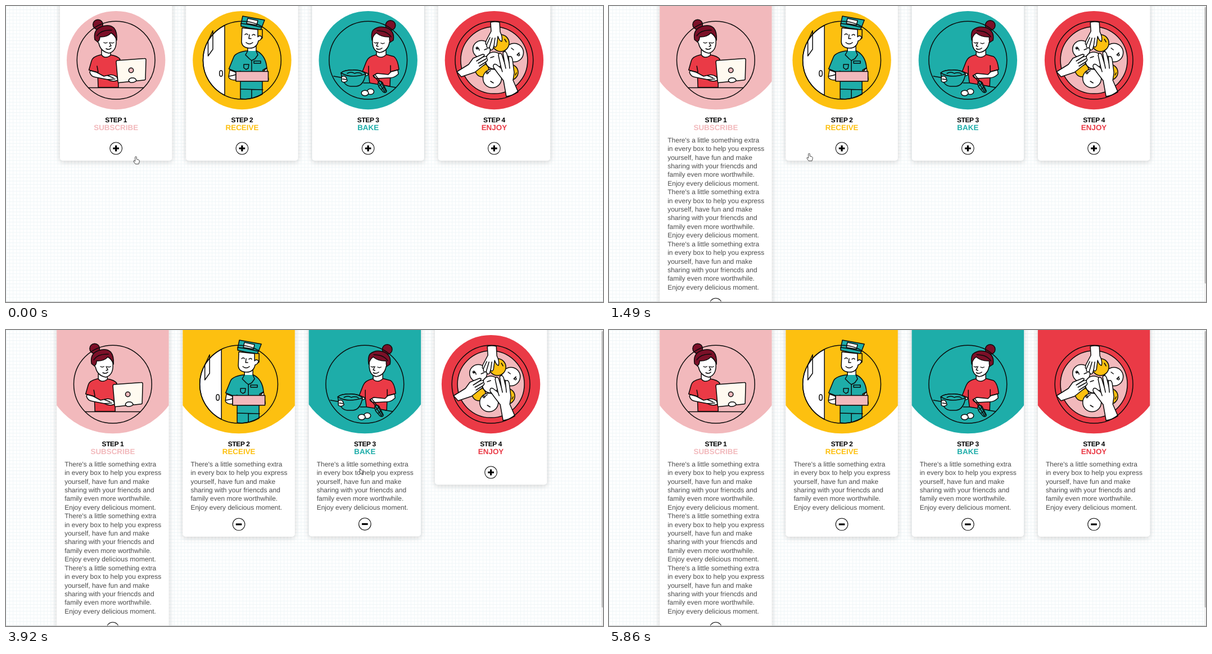
Animation of 1062 by 527 pixels, one loop 6360 ms. Source, as an HTML page:

```html
<!DOCTYPE html>
<html lang="en">
<head>
<meta charset="utf-8">
<title>Four steps</title>
<style>
  html, body { margin: 0; width: 100%; height: 100%; overflow: hidden; background: #fff; }
  svg { display: block; width: 1062px; height: 527px; }
  text { font-family: "Liberation Sans", Arial, sans-serif; text-rendering: geometricPrecision; }
  .step, .name { font-weight: bold; text-anchor: middle; }
  .step { font-size: 12px; letter-spacing: -.4px; }
  .name { font-size: 13.4px; }
  .copy text { font-size: 12px; fill: #4c4c4c; }
  .sheet { fill: #fff; filter: drop-shadow(0 2px 5px rgba(0, 0, 0, .18)); }
  .art { fill: none; stroke: #0b0b0b; stroke-width: 1.5; stroke-linejoin: round; stroke-linecap: round; }
  .art .thin { stroke-width: 1.1; }
  .art .dot { fill: #0b0b0b; stroke: none; }
  .w { fill: #fff; } .r { fill: #ea3a46; } .m { fill: #7b1028; }
  .t { fill: #1eada9; } .y { fill: #fdc010; } .p { fill: #f2b9bc; } .c { fill: #fffaf0; }
  .icon circle { fill: #fff; stroke: #111; stroke-width: 1.1; }
  #hand, #arrow { fill: #fff; stroke: #333; stroke-width: .9; stroke-linejoin: round; }
</style>
</head>
<body>
<svg viewBox="0 0 1062 527">
  <defs>
    <pattern id="grid" width="6.1" height="6.1" patternUnits="userSpaceOnUse">
      <path d="M.5 0V6.1M0 .5H6.1" stroke="#f0f6f8" fill="none"/>
    </pattern>

    <g id="art0">
      <path class="r" d="M168 87Q154 90 152 98L147.500 114L163 118L164 145H200V98L203 95Q199 89 186 87Z"/>
      <path class="w" d="M170 78V87Q176 95 186 88V80Z"/>
      <path class="w" d="M164 53Q159 61 165 66Q168 81 183 84Q195 81 196 66L196 50Q180 40 164 53Z"/>
      <circle class="m" cx="163.500" cy="33" r="8.800"/>
      <path class="m" d="M158 60Q155 44 167 38Q183 31 192 39Q198 46 197 61Q194 52 187 48Q179 56 167 55Q167 61 163 64Z"/>
      <path class="thin" d="M162 53Q169 42 188 43M174 65Q177 67 180 65M186 65Q189 67 192 65M184 65L187 71L184 72M178 76Q183 79 187 75M164 118L162 107"/>
      <path class="w" d="M150 115L149 118Q151 126 160 127L181 131Q190 136 199 132L197 126Q189 121 183 123L174 125L161 118Z"/>
      <path class="thin" d="M181 124L191 128M181 131L194 130"/>
      <path class="c" d="M198 97L246 93.500Q249 93 249 96L248 130Q248 132 245 132L201 136.500Q199 137 199 134L196 100Q196 97 198 97Z"/>
      <circle class="p" cx="222.500" cy="114.500" r="4.200"/>
      <path class="w" d="M218 133Q219 128 225 128Q231 128 232 133Q228 137 221 136Z"/>
      <path d="M147 145.500H245"/>
    </g>

    <g id="art1">
      <path class="w" d="M389 34.500V159A69.500 69.500 0 0 1 389 34.500Z"/>
      <path d="M359.500 62L368 44V77L359.500 89Z"/>
      <ellipse class="w" cx="382.500" cy="120" rx="2.800" ry="5.300"/>
      <path class="t" d="M417 132V165Q437 168 456 157V132Z"/>
      <path d="M417 148L457 149M437 149V164"/>
      <path class="t" d="M427 80Q408 83 405 91L396.500 112L412 118L417 116V134H457V114L464 110Q462 88 446 80Z"/>
      <path class="w" d="M430 70V81L437 96L445 81V70Z"/>
      <path class="t" d="M430 80L426 87L433 94L437 97L443 94L448 87L445 80"/>
      <path class="y" d="M442 39L456 42V57L451 61L446 53Z"/>
      <path class="w" d="M420 39L419 64Q420 74 432 75Q446 76 449 62Q454 61 455 55Q451 51 448 55V42Z"/>
      <path class="t" d="M421 18L460 25L455 38L418 32Z"/>
      <path class="w" d="M430 22L448 26L446 34L428 31Z"/>
      <path class="t" d="M418 31Q437 33 455 38L453 42Q433 40 418 36Z"/>
      <path class="thin" d="M425 51Q428 48 430 51M438 52Q441 49 443 52M433 51L432 58L436 58M427 65Q433 70 439 65M437 97V116M441 98H453V102H441ZM423 104H432L431 111L427 113L423 110Z"/>
      <path class="w" d="M398 114L396 126Q397 132 409 132V118ZM464 110L465 117L467 131H466V116.500H458Z"/>
      <path class="p" d="M409 116.500H466.500V134H409Z"/>
      <path class="thin" d="M397 125Q404 124 409 122"/>
    </g>

    <g id="art2">
      <path d="M583 125L600 128M636 137H646M676 142L693 145"/>
      <path class="r" d="M658 87Q644 90 641 99L634 117L645 121L647 137L683 143L684 117L699 113Q697 95 690 90L675 86Z"/>
      <path class="w" d="M659 79V88Q667 95 676 87V77Z"/>
      <path class="w" d="M652 50V66Q653 80 664 83Q679 81 682 65Q687 57 681 51Q665 43 652 50Z"/>
      <circle class="m" cx="684" cy="34.500" r="8.800"/>
      <path class="m" d="M651 61Q649 49 653 43Q663 34 678 39Q692 45 689 61L683 65Q682 61 682 55Q669 56 659 48Q653 52 651 61Z"/>
      <path class="thin" d="M660 44Q678 44 685 55M655 65Q658 67 660 65M667 66Q670 68 673 66M662 65L659 71L662 72M659 76Q664 79 669 75M645 107V121M684 117V106"/>
      <path class="w" d="M636 117L634 122Q641 127 645 121ZM697 114L698 121Q690 129 680 128L661 129Q655 129 653 124L660 120L680 122L685 117Z"/>
      <path class="t" d="M596 119Q599 142 613 143H623Q636 142 640 121Q633 113 617 114Q602 114 596 119Z"/>
      <path class="t" d="M596 119Q613 130 640 121Q633 113 617 114Q601 114 596 119ZM607 120Q614 116 620 120Q628 117 633 121"/>
      <path class="w" d="M597 126Q602 123 605 127L607 133Q602 138 597 134Z"/>
      <path class="thin" d="M599 130L605 131M654 124L665 137M657 123L667 136"/>
      <path class="t" d="M662 135Q667 132 670 137L677 151Q677 156 671 153L664 145Q661 140 662 135Z"/>
      <path class="thin" d="M663 136L674 153M667 135L676 152M664 142L670 137M668 148L673 144"/>
      <ellipse class="w" cx="648.500" cy="152.500" rx="6" ry="5"/>
      <ellipse class="w" cx="638.500" cy="155" rx="6.300" ry="4.800"/>
    </g>

    <g id="art3">
      <circle class="p" cx="868.400" cy="96.600" r="59.500"/>
      <circle class="y" cx="847" cy="114" r="12"/>
      <circle class="y" cx="897" cy="118" r="14"/>
      <circle class="w" cx="846" cy="77" r="15.500"/>
      <circle class="w" cx="904" cy="83" r="16.500"/>
      <circle class="w" cx="865" cy="129" r="16.500"/>
      <circle class="w" cx="868" cy="97" r="15"/>
      <circle class="y" cx="880" cy="66" r="15"/>
      <path class="thin" d="M837 76Q841 73 842 79M851 78L856 76M899 75L903 78M913 83L909 87M857 119L862 115M862 134L867 137M887 59L890 64M862 92L868 90M906 123L908 119"/>
      <g class="dot">
        <circle cx="838" cy="75" r="1.700"/><circle cx="912" cy="87" r="1.700"/>
        <circle cx="856" cy="119" r="1.700"/><circle cx="893" cy="91" r="1.700"/>
      </g>
      <path class="w" d="M862 29Q870 27 878 29L879 46Q884 56 882 63Q878 63 875 54L873 70Q870 76 868 71L866 77Q862 81 860 74Q855 77 855 69Q852 69 854 62L863 45Z"/>
      <path class="thin" d="M868 71L870 57M860 74L865 57M855 69L861 56"/>
      <path class="w" d="M802 117L823 104L831 93L848 86Q854 86 848 91Q857 88 855 93Q859 96 853 100Q855 103 849 106L834 118L810 126Z"/>
      <path class="thin" d="M848 91L837 98M854 94L840 102M853 100L842 107"/>
      <path class="w" d="M890 161L885 133L875 120L867 109Q866 102 872 104L881 111L876 88Q877 81 882 86L887 102L884 83Q888 78 891 85L895 101L894 91Q899 87 901 95L904 119L902 132L911 153Q900 160 890 161Z"/>
      <path class="thin" d="M887 102L889 111M895 101L896 111M881 111L883 117"/>
    </g>
  </defs>

  <rect width="1062" height="527" fill="url(#grid)"/>
  <g id="cards"></g>
  <g id="scrollbar">
    <rect x="1059" width="3" height="527" fill="#f1f1f1"/>
    <rect x="1059.500" y="2" width="4" height="492" rx="1.500" fill="#bcbcbc"/>
  </g>
  <rect y="526" width="1062" height="1" fill="#cfcfcf"/>
  <circle id="halo" r="8.500" fill="#ff0" fill-opacity=".47"/>
  <path id="hand" d="M-1.300 6V.8Q0-1 1.300 .8V4.800L5 5.800Q6.600 6.500 6.300 9L5 13.300H-.8L-3.800 9Q-4.300 6.800-2.800 7.200L-1.300 8.500Z"/>
  <path id="arrow" d="M0 0V9.500L2.200 7.600L3.800 11L5.300 10.300L3.800 7H6.800Z"/>
</svg>

<script>
const LOOP = 6360, PITCH = 224.23, HALF = 99.7, FIRST = 195.7;
const SHIFT = -5.8, SHIFT_AT = 1140, CLOSED = 275.5, LINE = 15.42, FADE = 44;
const COPY = ["There's a little something extra", "in every box to help you express",
  "yourself, have fun and make", "sharing with your friencds and",
  "family even more worthwhile.", "Enjoy every delicious moment."];
const STEPS = [
  { name: "SUBSCRIBE", color: "#f2b9bc", repeat: 3, opens: 938, click: 710, clickEnd: 910 },
  { name: "RECEIVE", color: "#fdc010", repeat: 1, opens: 2428, click: 2210, clickEnd: 2430 },
  { name: "BAKE", color: "#1eada9", repeat: 1, opens: 3650, click: 3410, clickEnd: 3640 },
  { name: "ENJOY", color: "#ea3a46", repeat: 1, opens: 4760, click: 4510, clickEnd: 4750 }
];
// Pointer tip: time, x, y
const PATH = [[0, 231, 268], [150, 231, 268], [430, 191.5, 256.5], [1240, 191.5, 256.5],
  [1490, 356, 262.5], [1530, 356, 262.5], [1630, 394, 265.5], [1880, 394, 265.5],
  [2060, 416.5, 253.5], [2760, 416.5, 253.5], [3060, 608, 248], [3160, 629.5, 247],
  [3960, 629.5, 247], [4260, 843, 248], [4310, 849.5, 248.5], [5060, 849.5, 248.5],
  [5360, 1006, 469], [5480, 1012, 482], [5860, 1025, 530], [LOOP, 1025, 530]];

const $ = id => document.getElementById(id);
const clamp = v => Math.max(0, Math.min(1, v));
const bezier = (a, b, s) => 3 * a * s * (1 - s) ** 2 + 3 * b * s * s * (1 - s) + s ** 3;

// The CSS "ease" curve
function ease(x) {
  if (x <= 0 || x >= 1) return clamp(x);
  let low = 0, high = 1;
  for (let i = 0; i < 24; i++) {
    const mid = (low + high) / 2;
    if (bezier(.25, .25, mid) < x) low = mid; else high = mid;
  }
  return bezier(.1, 1, low);
}

function cardMarkup(step, i) {
  const x = FIRST + i * PITCH, left = x - HALF;
  const lines = Array.from({ length: 6 * step.repeat }, (_, n) =>
    `<text x="${left + 14}" y="${242.7 + n * LINE}">${COPY[n % 6]}</text>`).join("");
  const box = `x="${left}" y="-20" width="${2 * HALF}"`;
  return `<g>
    <clipPath id="edge${i}"><rect class="size" ${box} rx="5"/></clipPath>
    <clipPath id="fold${i}"><rect class="fold" ${box}/></clipPath>
    <rect class="sheet size" ${box} rx="5"/>
    <g clip-path="url(#edge${i})"><circle class="disc" cx="${x}" fill="${step.color}"/></g>
    <g class="art"><use href="#art${i}"/><circle cx="${x}" cy="96.600" r="69.400"/></g>
    <text class="step" x="${x}" y="206.800">STEP ${i + 1}</text>
    <text class="name" x="${x}" y="221.300" fill="${step.color}">${step.name}</text>
    <g class="copy" clip-path="url(#fold${i})">${lines}</g>
    <g class="icon"><circle r="10.800"/><rect x="-5.300" y="-1.600" width="10.600" height="3.200"/>
      <rect class="bar" x="-1.600" y="-5.300" width="3.200" height="10.600"/></g>
  </g>`;
}

$("cards").innerHTML = STEPS.map(cardMarkup).join("");
STEPS.forEach((step, i) => {
  step.el = $("cards").children[i];
  step.find = selector => step.el.querySelector(selector);
});

function drawCard(step, i, t) {
  const grown = ease((t - step.opens) / 300), turned = ease((t - step.opens) / 400);
  const bottom = CLOSED + grown * 6 * step.repeat * LINE;
  const radius = 87.7 * (1 + .42 * turned);
  step.el.querySelectorAll(".size").forEach(r => r.setAttribute("height", bottom + 20));
  step.find(".fold").setAttribute("height", bottom - FADE + 20);
  step.find(".disc").setAttribute("r", radius);
  step.find(".disc").setAttribute("cy", 184.3 - radius);
  step.find(".copy").setAttribute("opacity", grown);
  step.find(".icon").setAttribute("transform", `translate(${FIRST + i * PITCH} ${bottom - 22})`);
  step.find(".bar").setAttribute("transform", `scale(1 ${1 - turned})`);
}

function drawPointer(t, shift) {
  const k = PATH.findIndex(p => p[0] > t);
  const [t0, x0, y0] = PATH[k - 1], [t1, x1, y1] = PATH[k];
  const f = (t - t0) / (t1 - t0), x = x0 + (x1 - x0) * f, y = y0 + (y1 - y0) * f;
  const overClosed = STEPS.some((s, i) =>
    t < s.opens + 40 && y < CLOSED && Math.abs(x - shift - FIRST - i * PITCH) < HALF);
  const pressed = STEPS.some(s => t >= s.click && t < s.clickEnd);
  const show = (id, on) => {
    $(id).setAttribute("transform", `translate(${x} ${y})`);
    $(id).setAttribute("visibility", on ? "visible" : "hidden");
  };
  show("halo", pressed);
  show("hand", overClosed);
  show("arrow", !overClosed);
}

const start = performance.now();
function frame() {
  const t = (performance.now() - start) % LOOP;
  const shift = t < SHIFT_AT ? 0 : SHIFT;
  $("cards").setAttribute("transform", `translate(${shift} 0)`);
  $("scrollbar").setAttribute("visibility", shift ? "visible" : "hidden");
  STEPS.forEach((step, i) => drawCard(step, i, t));
  drawPointer(t, shift);
  requestAnimationFrame(frame);
}
frame();
</script>
</body>
</html>
```
